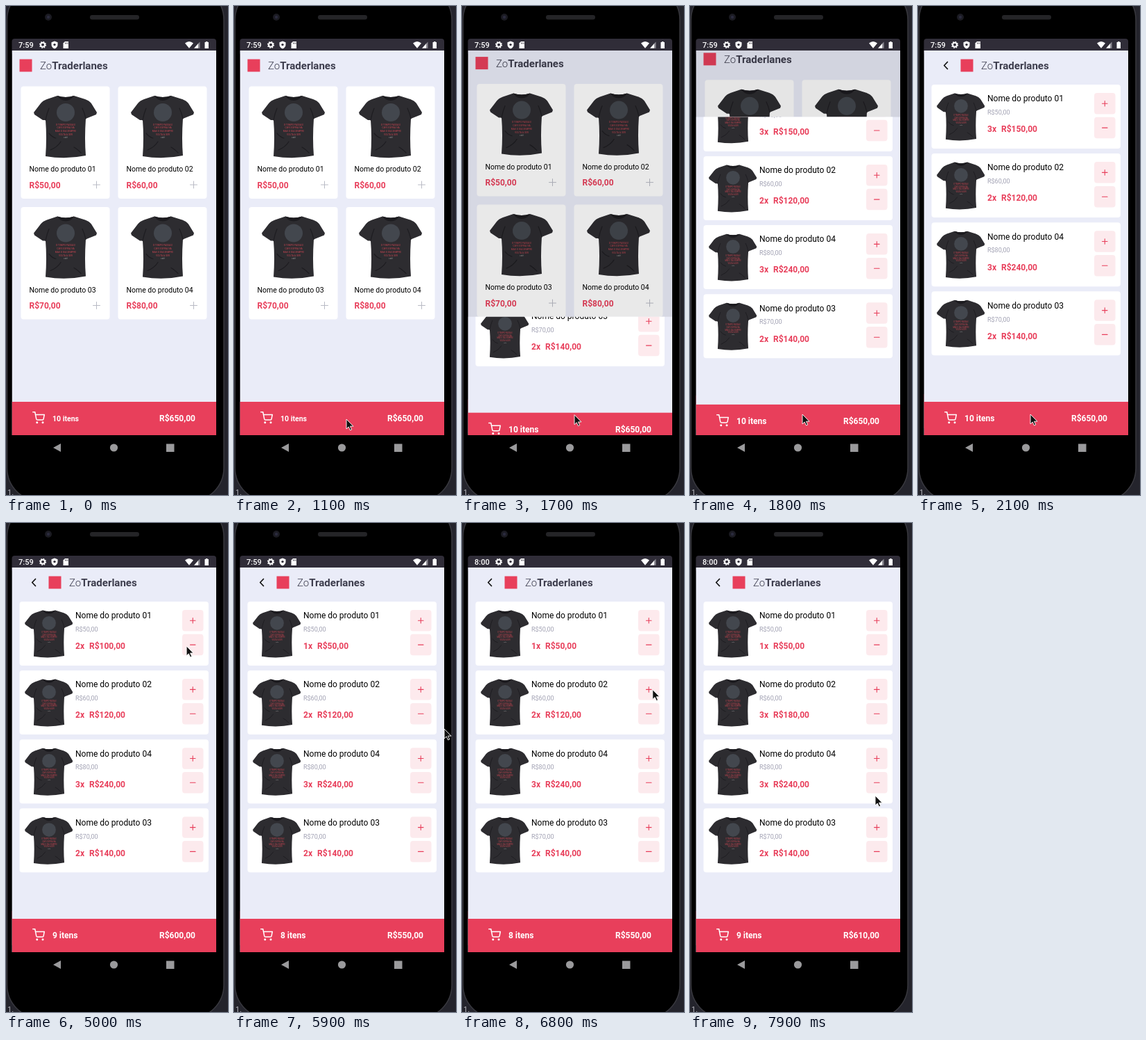
Write an HTML page that moves like this. It is 320 px wide and 703 px high and loops after 8 s.

```html
<!DOCTYPE html>
<html lang="pt-BR">
<head>
<meta charset="utf-8">
<title>Carrinho</title>
<style>
  html, body { margin: 0; width: 100%; height: 100%; overflow: hidden; background: #24242c; }
  svg { display: block; width: 320px; height: 703px; font-family: Roboto, sans-serif; }
  .bold { font-weight: 700; }
  .red { fill: #e83f5b; }
  .white { fill: #fff; }
  .card { fill: #fff; }
  .line { fill: none; stroke-linecap: round; stroke-linejoin: round; }
</style>
</head>
<body>
<svg id="stage" viewBox="0 0 320 703"></svg>
<script>
const RED = '#e83f5b', LEFT = 8.5, WIDTH = 294.5, TOP = 64, BOTTOM = 617, HEIGHT = BOTTOM - TOP;
const LOOP = 8000, OPEN = 1667, OPEN_TIME = 425;
const CLICKS = [4000, 5400, 7300], CLOCK = 6500;
const $ = id => document.getElementById(id);

const text = (x, y, size, s, cls = '', extra = '') =>
  `<text x="${x}" y="${y}" font-size="${size}" class="${cls}" ${extra}>${s}</text>`;
const rect = (x, y, w, h, r, extra) =>
  `<rect x="${x}" y="${y}" width="${w}" height="${h}" rx="${r}" ${extra}/>`;
const path = (d, color, width = 1) =>
  `<path d="${d}" class="line" stroke="${color}" stroke-width="${width}"/>`;
const money = n => `R$${n},00`;

const slogan = ['O TEMPO PASSA E', 'CAFE ESFRIA NA', 'MAS O DIA SEMPRE', 'VOLTA A SER']
  .map((s, i) => text(46, 44.5 + i * 4.9, 3.4, s, '', 'fill="#c04450" text-anchor="middle"')).join('');

const shirt = `<symbol id="shirt" viewBox="0 0 92 92">
  <path fill="#2d2c30" d="M34 2Q46 6 58 2L74 7Q80 9 83 13L91 26L90 29L75 35Q73 64 75 88Q46 94 17 89Q19 62 17 37L13 37L1 29L0 26L10 13Q13 9 19 7Z"/>
  <path fill="#1c1b1f" d="M34 2Q46 6 58 2Q54 9 46 9Q38 9 34 2Z"/>
  ${path('M17 37Q19 27 22 20M75 35Q73 26 70 20M24 80Q34 76 39 68M68 84Q62 78 58 76M22 56Q27 62 32 63', '#1d1c20', 1.2)}
  <circle cx="46" cy="26" r="13" fill="#43474e"/>
  ${slogan}
  ${text(46, 63, 3, 'café', '', 'fill="#999" text-anchor="middle"')}
</symbol>`;

const header = x => rect(x, 76.5, 18, 18, 0, `fill="${RED}"`) +
  `<text x="${x + 29.5}" y="91" font-size="15" fill="#3d3d4d"><tspan font-weight="300">Zo</tspan><tspan font-weight="700">Traderlanes</tspan></text>`;

const bar = (size, id) => rect(LEFT, 569, WIDTH, 49, 0, `fill="${RED}"`) +
  `<g transform="translate(38 583) scale(.75)">${path('M1 1h4l2.68 13.39a2 2 0 0 0 2 1.61h9.72a2 2 0 0 0 2-1.61L23 6H6M8 21a1 1 0 0 0 2 0a1 1 0 0 0-2 0M19 21a1 1 0 0 0 2 0a1 1 0 0 0-2 0', '#fff', 2)}</g>` +
  text(67, 597, size, '10 itens', 'bold white', `id="count${id}"`) +
  text(221, 597, 12, money(650), 'bold white', `id="total${id}"`);

const page = rect(LEFT, TOP, WIDTH, HEIGHT + 30, 0, 'fill="#eaecf8"');

const tile = n => {
  const x = 21.5 + n % 2 * 140, y = 115.5 + (n >> 1) * 173.5;
  return rect(x, y, 128, 161.5, 4, 'class="card"') +
    `<use href="#shirt" x="${x + 18.5}" y="${y + 11.5}" width="92" height="92"/>` +
    text(x + 12, y + 122.5, 10.5, `Nome do produto 0${n + 1}`) +
    text(x + 12, y + 146, 12, money(50 + n * 10), 'bold red') +
    path(`M${x + 104} ${y + 141.5}h10m-5-5v10`, '#b9bbc5');
};

const button = (id, y, d) => `<g id="${id}">` +
  rect(254, y, 30.5, 30.5, 4, `fill="${RED}" fill-opacity=".11"`) +
  path(`M265.5 ${y + 15.3}h7.5${d}`, RED, 1.1) + '</g>';

const row = (n, i) => {
  const y = 113 + i * 99.1;
  return rect(19.5, y, 272.5, 92, 4, 'class="card"') +
    `<use href="#shirt" x="27" y="${y + 11}" width="70" height="70"/>` +
    text(100, y + 24.3, 12, `Nome do produto 0${n}`) +
    text(100, y + 43.2, 9, money(40 + n * 10), '', 'fill="#a0a0b2"') +
    text(100, y + 68.3, 12, '', 'bold red', `id="qty${n}"`) +
    text(120, y + 68.3, 12, '', 'bold red', `id="sum${n}"`) +
    button('plus' + n, y + 12, 'm-3.75-3.75v7.5') + button('minus' + n, y + 46.8, '');
};

const status = rect(LEFT, 47, WIDTH, 24, 4, 'fill="#302d38"') +
  text(18, 59.8, 11, '7:59', 'white', 'id="clock" font-weight="500"') +
  `<circle cx="53" cy="55.8" r="3" fill="none" stroke="#fff" stroke-width="2"/>
   <circle cx="53" cy="55.8" r="4.4" fill="none" stroke="#fff" stroke-width="1.4" stroke-dasharray="1.7 1.75"/>
   <path class="white" d="M70 50.5l4.5 1.8v3.2q0 4-4.5 6q-4.5-2-4.5-6v-3.2z"/>
   <circle cx="70" cy="55.6" r="1.7" fill="#302d38"/>
   <path class="white" d="M85 51h5v10h-7.5v-7.5z"/>
   <path d="M85.5 52.5v2m1.7-2v2m1.7-2v2" stroke="#302d38" stroke-width=".8"/>
   <path class="white" d="M258 53.5Q264 48.5 270 53.5L264 60.7ZM277 54V60.7H271ZM286.5 52h1.5v-1h2.5v1h1.5v9h-5.5z"/>
   <path fill="#8c8a92" d="M277 54L279.5 51.5V60.7H277Z"/>`;

$('stage').innerHTML = `<defs>${shirt}
  <clipPath id="screen">${rect(LEFT, TOP, WIDTH, HEIGHT, 0, '')}</clipPath>
  <clipPath id="reveal">${rect(LEFT, TOP, WIDTH, HEIGHT, 0, 'id="cover"')}</clipPath></defs>
  ${rect(1.5, -28, 312.5, 740, 48, 'stroke="#38383e" stroke-width="1.5"')}
  ${rect(121, 13, 71, 6.5, 3.2, 'fill="#242427"')}
  <circle cx="61" cy="16" r="5" fill="#1b1b22"/><circle cx="61" cy="16" r="2.2" fill="#2b2b3d"/>
  ${text(2, 703, 11, '1.', '', 'fill="#b5b5bb"')}
  ${status}
  <g clip-path="url(#screen)">
    <g id="shop">${page}${header(19.5)}${[0, 1, 2, 3].map(tile).join('')}${bar(10.5, 'A')}</g>
    ${rect(LEFT, TOP, WIDTH, HEIGHT, 0, 'id="dim"')}
    <g clip-path="url(#reveal)"><g id="cart">${page}${header(61.5)}
      ${path('M42.5 80.5L37.7 85.5L42.5 90.5', '#111', 1.7)}
      ${[1, 2, 4, 3].map(row).join('')}${bar(12, 'B')}</g></g>
  </g>
  <path d="M79 629V641L68 635ZM231 629.5h11.5v11.5h-11.5z" fill="#9a9a9c"/>
  <circle cx="155.5" cy="635" r="5.6" fill="#9a9a9c"/>
  <path id="cursor" d="M0 0V14L3.2 11L5.5 16L7.7 15L5.5 10.2H10Z" fill="#111" stroke="#fff" stroke-width=".9"/>`;

const pointer = [[750, 162, 715], [1080, 162, 594], [1500, 162, 594], [1750, 162, 587], [2700, 162, 587],
  [3000, 197, 280], [3400, 261, 176], [5450, 260, 177], [5850, 303, 296], [6350, 303, 296],
  [6850, 274, 238], [7450, 274, 238], [7750, 268, 374], [7880, 267, 392]];

function pointerAt(t) {
  const i = pointer.findIndex(k => k[0] > t);
  if (i < 1) return (i ? pointer[pointer.length - 1] : pointer[0]).slice(1);
  const [a, b] = [pointer[i - 1], pointer[i]];
  const u = (t - a[0]) / (b[0] - a[0]), s = u * u * (3 - 2 * u);
  return [a[1] + (b[1] - a[1]) * s, a[2] + (b[2] - a[2]) * s];
}

// cubic-bezier(.20833, .82, .25, 1)
function ease(x) {
  if (x <= 0 || x >= 1) return x <= 0 ? 0 : 1;
  const at = (u, a, b) => 3 * (1 - u) ** 2 * u * a + 3 * (1 - u) * u * u * b + u ** 3;
  let lo = 0, hi = 1;
  for (let i = 0; i < 24; i++) {
    const mid = (lo + hi) / 2;
    if (at(mid, .20833, .25) < x) lo = mid; else hi = mid;
  }
  return at(lo, .82, 1);
}

const press = (t, click) => {
  const d = t - click;
  return d < -150 || d > 250 ? 1 : d < 0 ? .2 - d / 150 * .8 : .2 + d / 250 * .8;
};

function draw(t) {
  const p = ease((t - OPEN) / OPEN_TIME);
  $('shop').setAttribute('transform', `translate(0 ${-.02 * HEIGHT * p})`);
  $('dim').setAttribute('opacity', Math.min(p / .36, 1) * .1);
  $('cover').setAttribute('y', TOP + HEIGHT * (1 - p));
  $('cart').setAttribute('transform', `translate(0 ${.041 * HEIGHT * (1 - p)})`);

  const qty = [3 - (t >= CLICKS[0]) - (t >= CLICKS[1]), 2 + (t >= CLICKS[2]), 2, 3];
  let count = 0, total = 0;
  qty.forEach((q, i) => {
    const sum = q * (50 + i * 10);
    count += q;
    total += sum;
    $('qty' + (i + 1)).textContent = q + 'x';
    $('sum' + (i + 1)).textContent = money(sum);
  });
  $('countB').textContent = count + ' itens';
  $('totalB').textContent = money(total);
  $('minus1').setAttribute('opacity', Math.min(press(t, CLICKS[0]), press(t, CLICKS[1])));
  $('plus2').setAttribute('opacity', press(t, CLICKS[2]));
  $('clock').textContent = t < CLOCK ? '7:59' : '8:00';
  $('cursor').setAttribute('transform', `translate(${pointerAt(t)})`);
}

function loop() {
  draw(performance.now() % LOOP);
  requestAnimationFrame(loop);
}
loop();
</script>
</body>
</html>
```
